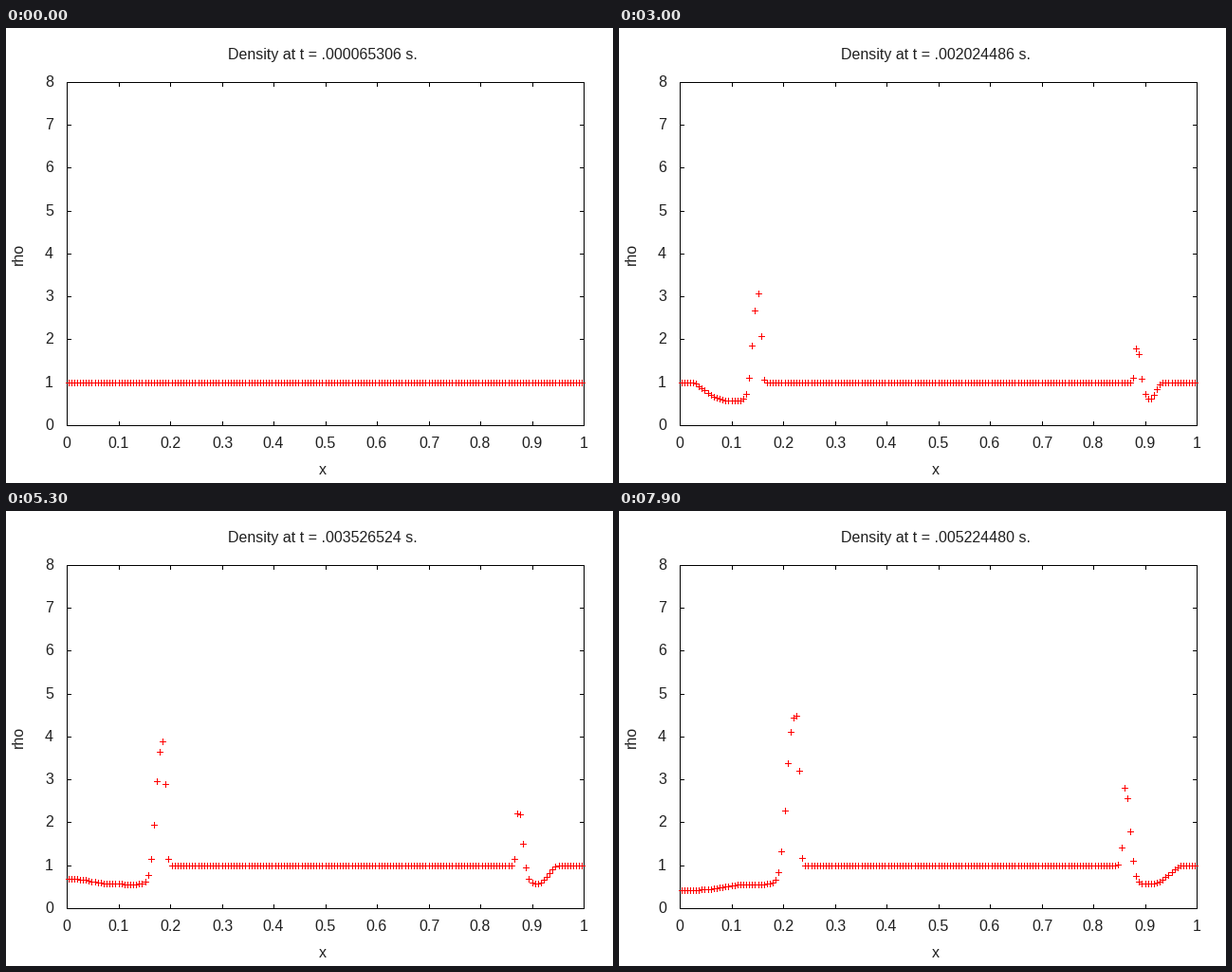
These frames come from a looping animation (640 by 480 pixels, 8 s). A matplotlib script:

```python
import numpy as np
import matplotlib.pyplot as plt
from matplotlib.animation import FuncAnimation
from matplotlib.collections import LineCollection

W, H, DPI = 640, 480, 100
LEFT, RIGHT, TOP, BOTTOM = 64, 609, 57, 419
CELLS, FRAMES = 175, 80
STEP_NS = 65306          # simulated time per step, in nanoseconds
FLOOR = 0.56             # density behind a rarefaction fan

plt.rcParams["font.family"] = "Liberation Sans"

# Each blast, in cells from its own wall. Lines are (start, speed per step);
# rise is (scale, time scale) of the logarithmic growth of the dense shell.
STRONG = dict(contact=(17.08, 0.2275), shock=(18.63, 0.2688),
              fan=(17.9, 0.39), rise=(1.43, 5), steep=7)
WEAK = dict(contact=(16.3, 0.0735), shock=(17.6, 0.0872),
            fan=(16.6, 1.233), rise=(1.45, 14), steep=12)


def sigmoid(z):
    return 1 / (1 + np.exp(-np.clip(z, -50, 50)))


def soft(z, k):
    """Smooth version of max(z, 0)."""
    return k * np.logaddexp(0, z / k)


def rarefaction(j, n, origin, slope):
    """Self-similar fan with rounded head and tail."""
    arg = np.clip(5 / 6 - slope * (j - origin) / n, 0, 1.5)
    rho = 1 - soft(1 - arg ** 5, 3 * slope / n)
    return FLOOR + soft(rho - FLOOR, 0.06)


def blast(j, n, contact, shock, fan, rise, steep):
    at = lambda line: line[0] + line[1] * n
    # The wall sends the fan back, faster and stronger than a plain mirror.
    echo = rarefaction(-1 - 0.75 * j, n, *fan) ** 1.3
    base = rarefaction(j, n, *fan) * echo
    height = rise[0] * np.log1p(n / rise[1])
    shell = height * sigmoid((1.05 + steep / n) * (j - at(contact)))
    front = sigmoid(3.5 * (at(shock) - j))
    start = min(1, (n - 1) / 11) ** 0.7
    return 1 + start * (base + shell - 1) * front


def density(n):
    i = np.arange(CELLS)
    return np.where(i < CELLS // 2,
                    blast(i, n, **STRONG),
                    blast(CELLS - 1 - i, n, **WEAK))


def px(x):
    return np.floor(LEFT + (RIGHT - LEFT) * np.asarray(x) + 0.5)


def py(rho):
    return BOTTOM - np.floor((BOTTOM - TOP) / 8 * np.asarray(rho) + 0.5)


def hline(x0, x1, y):
    return [(x0, y + 0.5), (x1 + 1, y + 0.5)]


def vline(x, y0, y1):
    return [(x + 0.5, y0), (x + 0.5, y1 + 1)]


def strokes(segments, color):
    lines = LineCollection(segments, colors=color, linewidths=72 / DPI, snap=False)
    ax.add_collection(lines, autolim=False)
    return lines


def label(x, y, text, **kw):
    return ax.text(x, y, text, fontsize=16 * 72 / DPI, va="baseline",
                   color="#202020", **{"ha": "center", **kw})


fig = plt.figure(figsize=(W / DPI, H / DPI), dpi=DPI, facecolor="white")
ax = fig.add_axes([0, 0, 1, 1])
ax.set_xlim(0, W)
ax.set_ylim(H, 0)
ax.axis("off")

frame = [hline(LEFT, RIGHT, TOP), hline(LEFT, RIGHT, BOTTOM),
         vline(LEFT, TOP, BOTTOM), vline(RIGHT, TOP, BOTTOM)]
for k in range(11):
    x = px(k / 10)
    frame += [vline(x, TOP, TOP + 4), vline(x, BOTTOM - 4, BOTTOM)]
    label(x, 443, f"{k / 10:g}")
for k in range(9):
    y = py(k)
    frame += [hline(LEFT, LEFT + 4, y), hline(RIGHT - 4, RIGHT, y)]
    label(50, y + 5, str(k), ha="right")
strokes(frame, "black")

label(333.5, 471, "x")
label(18, 238, "rho", rotation=90, rotation_mode="anchor")
title = label(334, 33, "")
marks = strokes([], "#ff0000")
cell_x = px((np.arange(CELLS) + 0.5) / CELLS)


def draw(f):
    n = f + 1
    title.set_text(f"Density at t = .{n * STEP_NS:09d} s.")
    segments = []
    for x, y in zip(cell_x, py(density(n))):
        segments += [hline(x - 3, x + 3, y), vline(x, y - 3, y + 3)]
    marks.set_segments(segments)
    return title, marks


anim = FuncAnimation(fig, draw, frames=FRAMES, interval=100,
                     repeat=True, repeat_delay=0, blit=False)
plt.show()
```
